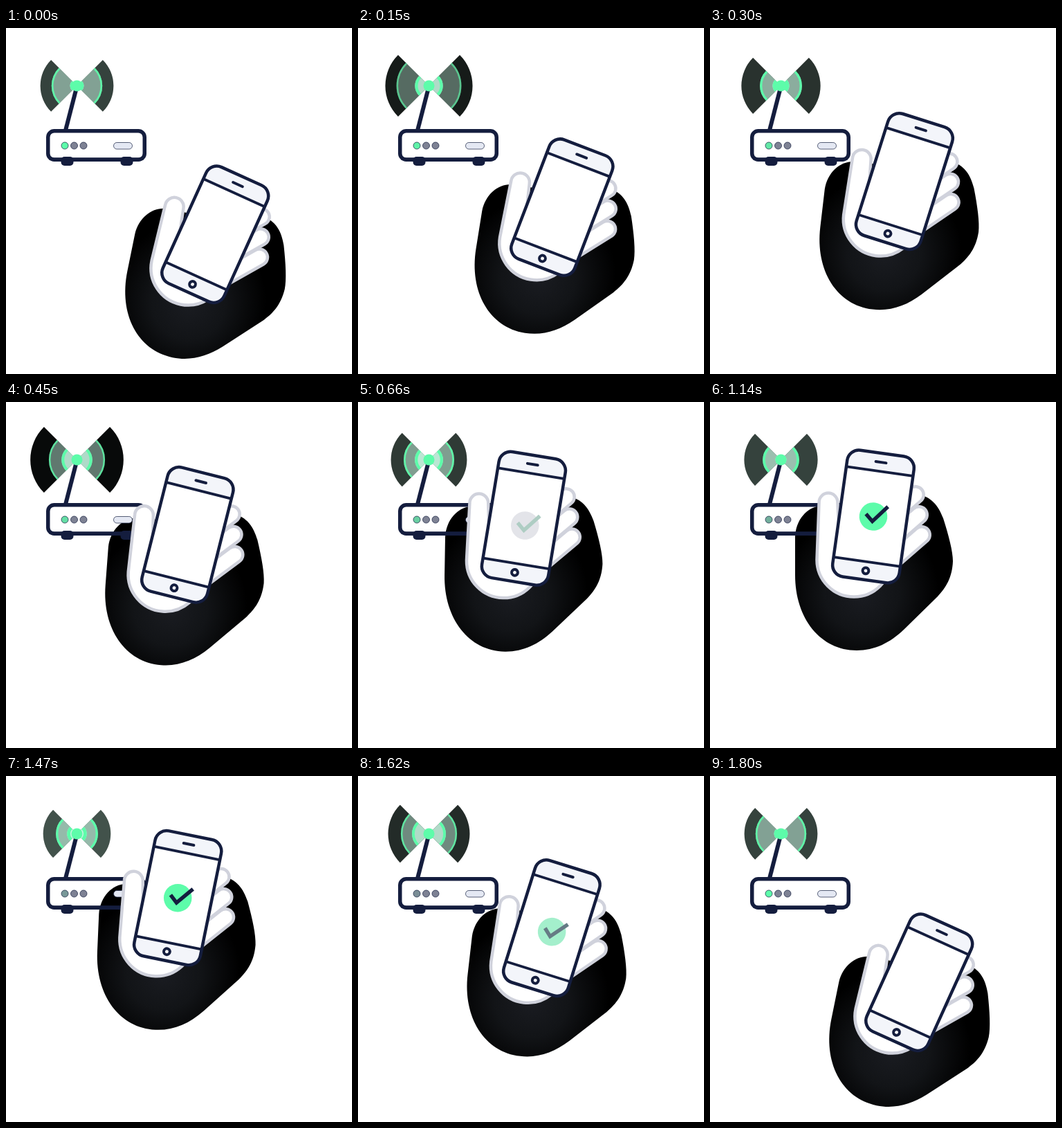
An HTML page with a canvas for the animation above (1830 ms loop, 500 by 500 pixels).

```html
<!DOCTYPE html>
<html>
<head>
<meta charset="utf-8">
<style>
html, body { margin: 0; width: 100%; height: 100%; overflow: hidden; background: #fff; }
canvas { display: block; }
</style>
</head>
<body>
<canvas id="stage" width="500" height="500"></canvas>
<script>
const ctx = document.getElementById('stage').getContext('2d');
const NAVY = '#141d3e', GREEN = '#5dfcaa', GREY = '#7e8294', EDGE = '#d0d2dc';
const LOOP = 1830, STEP = 30;

const clamp = x => Math.max(0, Math.min(1, x));
const lerp = (a, b, k) => a + (b - a) * k;
const mix = (a, b, k) => `rgb(${a.map((v, i) => Math.round(lerp(v, b[i], k)))})`;
const rgb = { green: [93, 252, 170], grey: [126, 130, 148], navy: [20, 29, 62], white: [255, 255, 255],
  pale: [227, 228, 233], sage: [174, 205, 195] };

function paint(fill, stroke, width) {
  if (fill) { ctx.fillStyle = fill; ctx.fill(); }
  if (stroke) { ctx.strokeStyle = stroke; ctx.lineWidth = width; ctx.stroke(); }
}
function box(x, y, w, h, r, fill, stroke, width) {
  ctx.beginPath();
  ctx.roundRect(x, y, w, h, r);
  paint(fill, stroke, width);
}
function disc(x, y, r, fill, stroke, width) {
  ctx.beginPath();
  ctx.arc(x, y, r, 0, 2 * Math.PI);
  paint(fill, stroke, width);
}
function line(points, color, width, cap = 'butt') {
  ctx.beginPath();
  points.forEach(p => ctx.lineTo(...p));
  ctx.lineCap = cap;
  paint(null, color, width);
}
function placed(x, y, degrees, draw) {
  ctx.save();
  ctx.translate(x, y);
  ctx.rotate(degrees * Math.PI / 180);
  draw();
  ctx.restore();
}

// Left and right quarter sectors; without a hub only their arcs
function sectors(r, hub) {
  ctx.beginPath();
  for (const a of [-Math.PI / 4, Math.PI * 3 / 4]) {
    if (hub) ctx.moveTo(0, 0);
    else ctx.moveTo(r * Math.cos(a), r * Math.sin(a));
    ctx.arc(0, 0, r, a, a + Math.PI / 2);
    if (hub) ctx.closePath();
  }
}

function waves(t) {
  const ages = [];
  for (const start of [-135, 135, 372]) {
    const age = (t - start + 1800) % 900;
    ages.push(age);
    if (age < 95) ages.push(age + 900);
  }
  ages.sort((a, b) => b - a).forEach((age, i) => {
    const r = age * 0.068 + 0.8, alpha = clamp((70 - r) / 66);
    sectors(r, true);
    if (!i) paint('#000');
    paint(`rgba(206,255,234,${alpha})`);
    const width = Math.max(2.5, 6 - r * 0.09);
    if (i && r > width) {
      sectors(r - width / 2, false);
      ctx.globalAlpha = clamp(alpha * 1.8);
      ctx.lineCap = 'butt';
      paint(null, GREEN, width);
      ctx.globalAlpha = 1;
    }
  });
}

function router(t) {
  for (const x of [79.5, 165.5]) box(x, 186, 18, 13, 5, NAVY);
  line([[102, 86], [86, 148]], NAVY, 6);
  // The casing is hollow: the shadow shows through it
  ctx.save();
  ctx.beginPath();
  ctx.rect(62, 187.5, 137, 3);
  paint(NAVY);
  ctx.restore();
  box(60.75, 148.75, 139.5, 41.5, 9, null, NAVY, 5.5);
  const dim = t < 1620 ? t / 1620 : (1800 - t) / 180;
  disc(85, 170, 5, mix(rgb.green, rgb.grey, clamp(dim) * 0.9), NAVY, 0.7);
  for (const x of [98.5, 112]) disc(x, 170, 5, GREY, NAVY, 0.7);
  box(155.5, 165.5, 27, 9.5, 4.7, '#e4e8f3', NAVY, 0.7);
  placed(102.5, 83.5, 0, () => waves(t));
  disc(102.5, 83.5, 8, GREEN);
}

function shadow() {
  const glow = ctx.createRadialGradient(12, 52, 5, 10, 45, 112);
  glow.addColorStop(0, '#191b20');
  glow.addColorStop(0.45, '#121417');
  glow.addColorStop(1, '#000');
  ctx.beginPath();
  ctx.moveTo(-85, -33);
  ctx.bezierCurveTo(-84, -58, -68, -76, -48, -78);
  ctx.lineTo(32, -78);
  ctx.lineTo(90, -95);
  ctx.bezierCurveTo(112, -92, 122, -78, 129, -60);
  ctx.bezierCurveTo(137, -35, 143, -12, 143, 2);
  ctx.bezierCurveTo(142, 26, 133, 40, 121, 53);
  ctx.lineTo(72, 101);
  ctx.bezierCurveTo(52, 120, 30, 131, 4, 131);
  ctx.bezierCurveTo(-48, 131, -85, 85, -85, 22);
  ctx.closePath();
  paint(glow);
}

function hand() {
  for (const [x, y] of [[89, -94], [94, -65], [98, -36]]) {
    const finger = [[x, y], [x - 45, y + 39]];
    line(finger, EDGE, 28, 'round');
    line(finger, '#fff', 19, 'round');
  }
  ctx.beginPath();
  ctx.arc(-37, -83, 13.4, 0, Math.PI, true);
  ctx.arc(0, 0, 53.5, Math.PI, 0, true);
  ctx.lineTo(-22, -50);
  ctx.closePath();
  paint('#fff', EDGE, 4.5);
}

function badge(t) {
  const show = t < 1300 ? clamp((t - 600) / 240) : clamp((1740 - t) / 200);
  if (!show) return;
  const early = clamp(show * 4), late = clamp((show - 0.25) / 0.75);
  const tint = (first, last) => late ? mix(first, last, late) : mix(rgb.white, first, early);
  placed(4.7 * (1 - show), 13 * (1 - show), 0, () => {
    disc(0, 0, 20.3, tint(rgb.pale, rgb.green));
    line([[-11, -2.2], [-0.4, 7.1], [19, -17]], tint(rgb.sage, rgb.navy), 5.4);
  });
}

function phone(t) {
  box(-48.7, -92.3, 97.4, 184.6, 17, '#f3f5fa');
  ctx.fillStyle = '#fff';
  ctx.fillRect(-48.7, -66, 97.4, 132);
  badge(t);
  for (const y of [-66, 66]) line([[-48, y], [48, y]], NAVY, 3.8);
  box(-48.7, -92.3, 97.4, 184.6, 17, null, NAVY, 4.5);
  line([[-7.5, -79.2], [7.5, -79.2]], NAVY, 4, 'round');
  disc(0, 79.2, 4.4, '#fff', NAVY, 4);
}

// Distance from the raised pose: 1 is low and tilted, 0 is raised
function pose(t) {
  const soft = x => x + 0.75 * x * x * (1 - x);
  if (t < 720) return { turn: 1 - t / 720, move: 1 - soft(t / 720) };
  const back = clamp((t - 1380) / 420);
  return { turn: back, move: 1 - soft(1 - back) };
}

function draw(t) {
  ctx.fillStyle = '#fff';
  ctx.fillRect(0, 0, 500, 500);
  const { turn, move } = pose(t);
  const bend = 2 * move * (1 - move);
  const x = 236 + 66.25 * (bend * 0.84 + move * move);
  const y = 165.5 + 132.75 * (bend * 0.33 + move * move);
  const palm = [x - lerp(28, 39.25, turn), y + lerp(62.5, 48.75, turn), 11.5 * turn];
  placed(...palm, shadow);
  router(t);
  placed(...palm, hand);
  placed(x, y, 8 + 16.4 * turn, () => phone(t));
}

const begin = performance.now();
function tick() {
  const t = (performance.now() - begin) % LOOP;
  draw(Math.floor(t / STEP) * STEP);
  requestAnimationFrame(tick);
}
tick();
</script>
</body>
</html>
```
